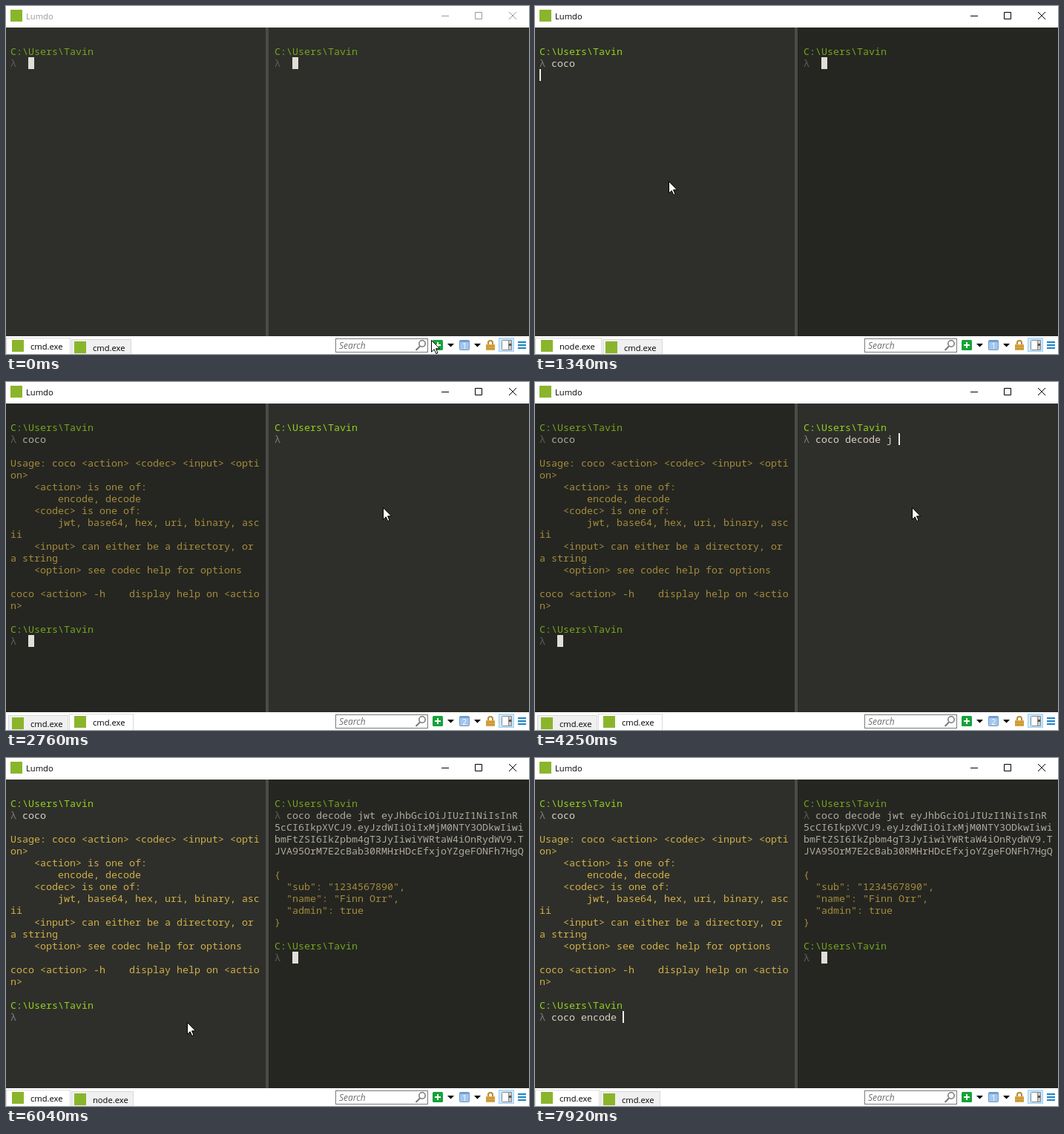
Animation, 705 px wide and 469 px high, one loop 8 s. Source, as an HTML page:

```html
<!DOCTYPE html>
<html lang="en">
<head>
<meta charset="utf-8">
<title>Split terminal</title>
<style>
html, body { margin: 0; width: 705px; height: 469px; overflow: hidden; background: #fff; }
body { position: relative; }
.pane {
  --prompt: #94cf1d; --lambda: #7c7c75; --input: #d9d0c5; --output: #d0b04a;
  position: absolute; top: 29px; height: 416px; overflow: hidden; background: #2e2f2a;
}
.pane.faded { --prompt: #76a41f; --lambda: #5c5d57; --input: #b0aa9f; --output: #a48b3c; }
.pane.shaded { background: #252621; }
#left { left: 0; width: 350px; }
#right { left: 354px; width: 351px; }
#split { position: absolute; left: 350px; top: 29px; width: 4px; height: 416px; background: #4b4c49; }
pre {
  position: absolute; top: 24px; margin: 0; color: var(--input);
  font: 13.333px/16px "Noto Sans Mono", "DejaVu Sans Mono", monospace;
  font-variant-ligatures: none;
}
#left pre { left: 6px; }
#right pre { left: 8px; }
.prompt { color: var(--prompt); }
.lambda { color: var(--lambda); }
.output { color: var(--output); }
.caret { position: absolute; width: 2px; height: 16px; background: #f0f0e8; }
.faded .caret { width: 8px; background: #dfdfd7; }
svg { position: absolute; left: 0; top: 0; }
svg text { font: 11.2px "Open Sans", "Noto Sans", sans-serif; }
#find { font-size: 12px; font-style: italic; fill: #6d6d6d; }
</style>
</head>
<body>
<div id="left" class="pane"><pre></pre><div class="caret"></div></div>
<div id="split"></div>
<div id="right" class="pane"><pre></pre><div class="caret"></div></div>
<svg width="705" height="469" viewBox="0 0 705 469">
  <path fill="#fff" d="M0 0H705V29H0ZM0 445H705V469H0Z"/>
  <rect x="6" y="5" width="16" height="16" fill="#8ab52b"/>
  <g id="title">
    <text x="27" y="18" fill="currentColor">Lumdo</text>
    <path fill="none" stroke="currentColor" d="M587 13.5h10M632.5 8.5h9v9h-9ZM678 8l10 10M688 8l-10 10"/>
  </g>
  <g id="tabs"></g>

  <rect x="444.5" y="448.5" width="124" height="18" fill="#fff" stroke="#7a7a7a"/>
  <text id="find" x="449" y="462">Search</text>
  <g fill="none" stroke="#777" stroke-width="1.5">
    <circle cx="561" cy="455" r="4.2"/><path stroke-width="2" d="M558 458.5l-5.5 5.5"/>
  </g>
  <rect x="575" y="450" width="14" height="14" rx="1.5" fill="#16a339"/>
  <path fill="none" stroke="#fff" stroke-width="2" d="M582 453v8M578 457h8"/>
  <path d="M595 455h9l-4.500 4.500ZM631 455h9l-4.500 4.500Z"/>
  <rect x="611.500" y="450.500" width="13" height="13" rx="1" fill="#a5c6ea" stroke="#6c9bd0"/>
  <path fill="#6fa1db" d="M612 451h12v2h-12Z"/>
  <text id="badge" x="618" y="462" text-anchor="middle" fill="#fff" style="font-size:10px"></text>
  <path fill="none" stroke="#b98a33" stroke-width="2" d="M650 457v-3a3 3 0 0 1 6 0v3"/>
  <rect x="647" y="456" width="12" height="8" fill="#dca945"/>
  <path stroke="#b98a33" d="M647 458.500h12M647 461.500h12"/>
  <rect x="664.500" y="447.500" width="20" height="18" fill="#cce8ff" stroke="#99d1ff"/>
  <rect x="668.500" y="450.500" width="13" height="13" rx="1" fill="#fff" stroke="#888"/>
  <path fill="#ccc" stroke="#888" d="M677.500 450.500h4v13h-4Z"/>
  <path fill="#555" d="M678 455h3v3h-3Z"/>
  <path stroke="#1b82c5" stroke-width="2" d="M690 453h11M690 457h11M690 461h11"/>
  <path id="mouse" fill="#fff" stroke="#000" stroke-linejoin="round"
        d="M.5.5V16.200L4.200 12.800 6.800 18.500 9 17.500 6.500 11.800H11.500Z"/>
</svg>
<script>
const LOOP = 8000, CELL = 8, ROW = 16, COLS = 42;
const $ = id => document.getElementById(id);

const HELP = [
  'Usage: coco <action> <codec> <input> <option>',
  '    <action> is one of:',
  '        encode, decode',
  '    <codec> is one of:',
  '        jwt, base64, hex, uri, binary, ascii',
  '    <input> can either be a directory, or a string',
  '    <option> see codec help for options',
  '',
  'coco <action> -h    display help on <action>'
].map(s => s.replace(new RegExp(`.{${COLS}}(?=.)`, 'g'), '$&\n')).join('\n');

const TOKEN = `eyJhbGciOiJIUzI1NiIsInR
5cCI6IkpXVCJ9.eyJzdWIiOiIxMjM0NTY3ODkwIiwi
bmFtZSI6IkZpbm4gT3JyIiwiYWRtaW4iOnRydWV9.T
JVA95OrM7E2cBab30RMHrHDcEfxjoYZgeFONFh7HgQ`;

const JSON_OUT = `{
  "sub": "1234567890",
  "name": "Finn Orr",
  "admin": true
}`;

// Key press times, one per character.
const KEYS = {
  first: [590, 730, 806, 958],
  decode: [2900, 3130, 3290, 3290, 3430, 3510, 3650, 3790, 3870, 3870, 4010,
           4170, 4250, 4320, 4390, 4530],
  encode: [6860, 6936, 7012, 7088, 7164, 7164, 7240, 7550, 7620, 7690, 7920]
};

// Pointer moves: start, end, number of jumps, destination.
const MOVES = [
  [60, 200, 4, 180, 236],
  [1560, 1920, 6, 508, 169],
  [5670, 5960, 5, 244, 356],
  [6110, 6260, 3, 236, 362]
];
const HIDDEN = [[360, 1034], [2240, 2370], [4690, 5140], [7920, LOOP]];

const within = (t, spans) => spans.some(([a, b]) => t >= a && t < b);
const typed = (t, text, keys) => text.slice(0, keys.filter(k => k <= t).length);
const esc = s => s.replace(/&/g, '&amp;').replace(/</g, '&lt;');
const span = (name, s) => `<span class="${name}">${esc(s)}</span>`;
const prompt = cmd => span('prompt', 'C:\\Users\\Tavin') + '\n' + span('lambda', 'λ') + ' ' + esc(cmd);

// Each screen gives its markup and the caret's column and row.
function leftScreen(t) {
  const cmd = typed(t, 'coco', KEYS.first);
  if (t < 1480) {
    return [prompt(cmd), ...(t < 1110 ? [3 + cmd.length, 1] : [0, 2])];
  }
  const next = typed(t, 'coco encode', KEYS.encode);
  return [prompt(cmd) + '\n\n' + span('output', HELP) + '\n\n' + prompt(next), 3 + next.length, 18];
}

function rightScreen(t) {
  const cmd = typed(t, 'coco decode jwt ', KEYS.decode);
  if (t < 5070) return [prompt(cmd), 3 + cmd.length, 1];
  const full = prompt(cmd + TOKEN);
  if (t < 5740) return [full, 0, t < 5450 ? 5 : 6];
  return [full + '\n\n' + span('output', JSON_OUT) + '\n\n' + prompt(''), 3, 13];
}

function drawPane(id, [html, col, row], focused, awake, blinkOff) {
  const pane = $(id), [pre, caret] = pane.children;
  if (pre.markup !== html) pre.innerHTML = pre.markup = html;
  pane.classList.toggle('faded', !(awake && focused));
  pane.classList.toggle('shaded', awake && !focused);
  caret.style.left = (id === 'left' ? 6 : 8) + col * CELL + 'px';
  caret.style.top = 24 + row * ROW + 'px';
  caret.style.visibility = focused && blinkOff ? 'hidden' : 'visible';
}

function drawTabs(names, active) {
  let x = 3, html = '';
  names.forEach((name, i) => {
    const w = name === 'cmd.exe' ? 81 : 84, on = i === active, grow = on ? 3 : 0, y = on ? 447 : 449;
    const tab = `<rect x="${x - grow + .5}" y="${y + .5}" width="${w + 2 * grow - 1}" height="30"
      fill="${on ? '#fff' : '#f0f0f0'}" stroke="#d9d9d9"/>
      <rect x="${x + 5 - i}" y="${y + 3}" width="16" height="16" fill="#8ab52b"/>
      <text x="${x + 30 - i}" y="${y + 16}">${name}</text>`;
    html = on ? html + tab : tab + html;
    x += w + 4;
  });
  const tabs = $('tabs');
  if (tabs.markup !== html) tabs.innerHTML = tabs.markup = html;
}

function pointer(t) {
  let x = 573, y = 450;
  for (const [from, to, n, tx, ty] of MOVES) {
    if (t < from) break;
    const step = Math.min(n, 1 + Math.floor((t - from) / (to - from) * (n - 1)));
    x += (tx - x) * step / n;
    y += (ty - y) * step / n;
  }
  return [Math.round(x), Math.round(y)];
}

function draw(t) {
  const awake = t >= 150;
  const active = t >= 1920 && t < 5960 ? 1 : 0;
  const blinkOff = within(t, [[2000, 2240], [2760, 2900], [5960, 6570]]);
  drawPane('left', leftScreen(t), active === 0, awake, blinkOff);
  drawPane('right', rightScreen(t), active === 1, awake, blinkOff);
  drawTabs([
    within(t, [[1340, 1560]]) ? 'node.exe' : 'cmd.exe',
    within(t, [[5600, 6110]]) ? 'node.exe' : 'cmd.exe'
  ], active);
  $('title').style.color = awake ? '#000' : '#999';
  $('badge').textContent = active + 1;
  $('mouse').setAttribute('transform', `translate(${pointer(t)})`);
  $('mouse').style.visibility = within(t, HIDDEN) ? 'hidden' : 'visible';
}

const start = performance.now();
function tick() {
  draw((performance.now() - start) % LOOP);
  requestAnimationFrame(tick);
}
tick();
</script>
</body>
</html>
```
